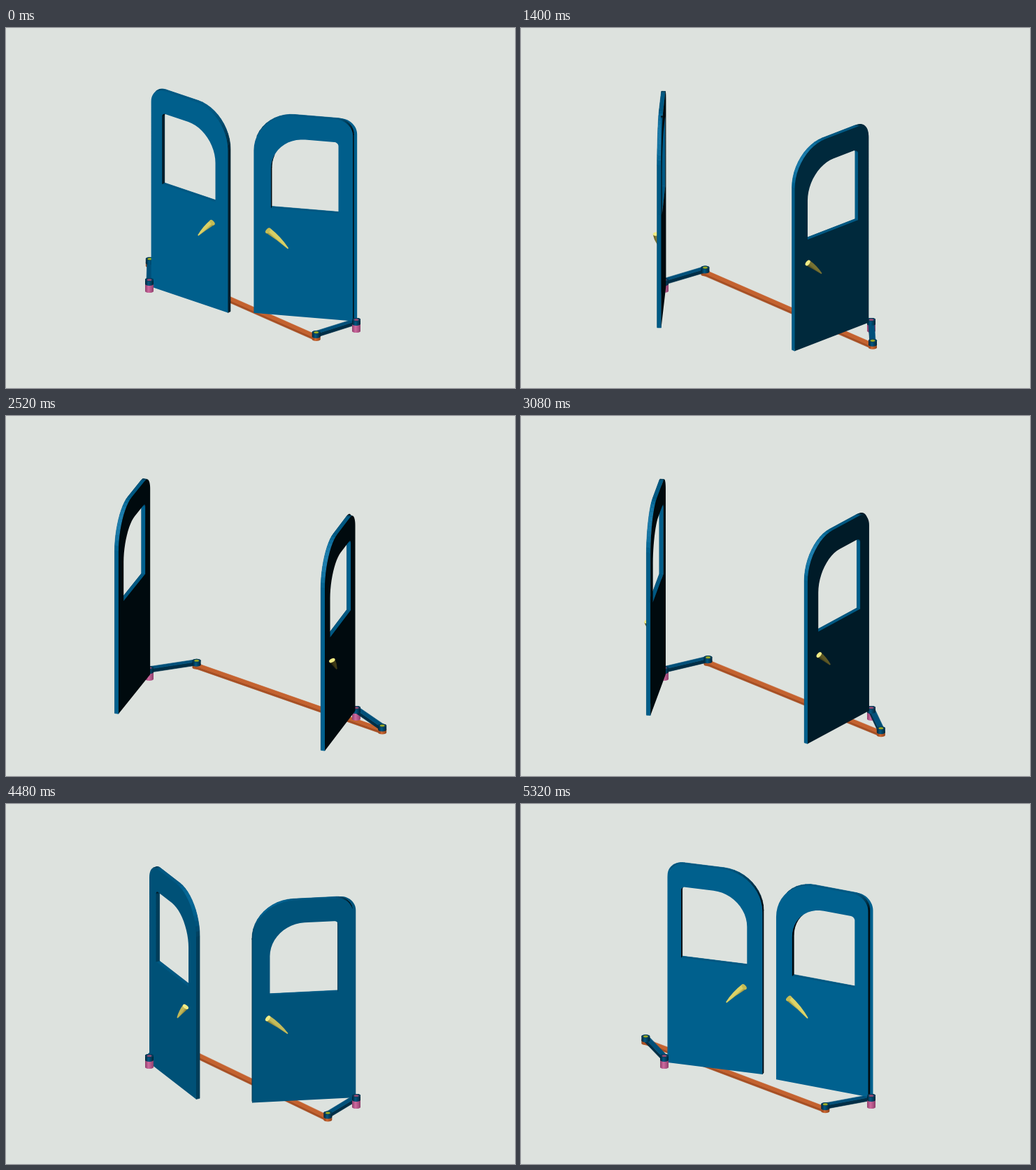
An HTML page with a canvas for the animation above (5600 ms loop, 728x514 px).

```html
<!DOCTYPE html>
<html lang="en">
<head>
<meta charset="utf-8">
<title>Linked double doors</title>
<style>
  html, body { margin: 0; width: 100%; height: 100%; overflow: hidden; background: #dde2de; }
  canvas { display: block; width: 728px; height: 514px; }
</style>
</head>
<body>
<canvas id="stage" width="728" height="514"></canvas>
<script>
const ctx = document.getElementById('stage').getContext('2d');
const RAD = Math.PI / 180;
const STEP = 280;
const TILT = 0.414, RISE = 0.91;        // screen scale of ground depth and of height
const ARM = 72, ROD = 347.5;

// Right door angle in degrees for each time step.
const SWING = [191.3, 191.3, 160, 160, 149, 137, 124.5, 112, 96.5, 107.5,
               117.5, 127.5, 138, 146, 155, 164, 173, 184, 195, 204.5];

const LEFT = {
  x: 205, y: 367, pivotY: 359.5, armOffset: -128.5, end: 147.5,
  front: { w: 3.2, u: 6 }, back: { w: -2.6, u: 4 }, facing: 1,
  grip: { u: 121, w: 6, v: 135 }, tip: { u: 94, w: 5, v: 106.5 }
};
const RIGHT = {
  x: 501, y: 419, pivotY: 416.5, armOffset: -48.6, end: 149.5,
  front: { w: 0, u: 5 }, back: { w: 6, u: 0 }, facing: -1,
  grip: { u: 128, w: -4, v: 133 }, tip: { u: 99, w: -2, v: 106.5 }
};

const LIGHT = { x: Math.cos(116 * RAD), y: Math.sin(116 * RAD), z: 0.9 };
const mix = (a, b, t) => a.map((c, i) => c + (b[i] - c) * t);
const rgb = c => `rgb(${c.map(Math.round)})`;

function brightness(x, y, z) {
  return x * LIGHT.x + y * LIGHT.y + z * LIGHT.z;
}

function paint(k) {
  const base = [0, 97, 143];
  if (k > 1) return rgb(mix(base, [90, 185, 235], k - 1));
  return rgb(mix([0, 10, 14], base, Math.max(0, k)));
}

function trace(points) {
  points.forEach((p, i) => i ? ctx.lineTo(p.x, p.y) : ctx.moveTo(p.x, p.y));
  ctx.closePath();
}

function polygon(points, color, seam) {
  ctx.beginPath();
  trace(points);
  ctx.fillStyle = color;
  ctx.fill();
  if (seam) {
    ctx.strokeStyle = color;
    ctx.lineWidth = 0.6;
    ctx.stroke();
  }
}

function ellipse(x, y, rx, ry, color) {
  ctx.beginPath();
  ctx.ellipse(x, y, rx, ry, 0, 0, 2 * Math.PI);
  ctx.fillStyle = color;
  ctx.fill();
}

// Rectangle with a small rounding at the hinge side and a big one at the free side.
function outline(u0, u1, v0, v1, small, big) {
  const pts = [[u0, v0], [u1, v0]];
  const arc = (cu, cv, r, from) => {
    for (let i = 0; i <= 12; i++) {
      const a = (from + i * 7.5) * RAD;
      pts.push([cu + r * Math.cos(a), cv + r * Math.sin(a)]);
    }
  };
  arc(u1 - big, v1 - big, big, 0);
  arc(u0 + small, v1 - small, small, 90);
  return pts;
}

function projector(door, angle) {
  const c = Math.cos(angle), s = Math.sin(angle);
  return (u, v, w) => ({
    x: door.x + u * c - w * s,
    y: door.y + TILT * (u * s + w * c) - RISE * v
  });
}

function drawRims(pts, near, far, project, angle, side) {
  const c = Math.cos(angle), s = Math.sin(angle);
  pts.forEach(([u, v], i) => {
    const [u2, v2] = pts[(i + 1) % pts.length];
    const len = Math.hypot(u2 - u, v2 - v);
    if (len < 0.01) return;
    const nu = side * (v2 - v) / len, nv = -side * (u2 - u) / len;
    if (nu * s * RISE + nv * TILT <= 0) return;
    polygon([
      project(u, v, near.w), project(u2, v2, near.w),
      project(u2, v2, far.w), project(u, v, far.w)
    ], paint(brightness(nu * c, nu * s, nv)), true);
  });
}

function drawHandle(door, project, k) {
  const a = project(door.grip.u, door.grip.v, door.grip.w);
  const b = project(door.tip.u, door.tip.v, door.tip.w);
  const dx = b.x - a.x, dy = b.y - a.y, len = Math.hypot(dx, dy);
  const nx = -dy / len, ny = dx / len;
  const bow = door.facing * -0.06 * len;
  const mid = { x: a.x + dx / 2 - nx * bow, y: a.y + dy / 2 - ny * bow };
  const off = (p, r) => [p.x + nx * r, p.y + ny * r];
  const shade = Math.max(0, Math.min(1, k));
  const body = mix([62, 58, 22], [222, 213, 104], shade);
  const dark = mix([20, 18, 4], [128, 120, 44], shade);
  const g = ctx.createLinearGradient(...off(a, -5), ...off(a, 5));
  const [first, last] = nx * 0.3 - ny > 0 ? [dark, body] : [body, dark];
  g.addColorStop(0, rgb(first));
  g.addColorStop(0.5, rgb(body));
  g.addColorStop(1, rgb(last));
  ctx.beginPath();
  ctx.moveTo(...off(a, 4.5));
  ctx.quadraticCurveTo(...off(mid, 3.4), ...off(b, 0.8));
  ctx.lineTo(...off(b, -0.8));
  ctx.quadraticCurveTo(...off(mid, -3.4), ...off(a, -4.5));
  ctx.fillStyle = g;
  ctx.fill();
  ctx.beginPath();
  ctx.ellipse(a.x, a.y, 2.6, 4.6, Math.atan2(dy, dx), 0, 2 * Math.PI);
  ctx.fillStyle = k > 0.85 ? '#c5bc55' : '#f1ec86';
  ctx.fill();
}

function drawDoor(door, angle) {
  const project = projector(door, angle);
  const plate = ({ u }) => outline(u, door.end, 0, 314, 23, 59);
  const hole = outline(26, 124.5, 167, 278.5, 6, 50);
  const frontNear = door.facing * Math.cos(angle) > 0;
  const [near, far] = frontNear ? [door.front, door.back] : [door.back, door.front];

  const sign = Math.cos(angle) > 0 ? 1 : -1;
  const k = brightness(-Math.sin(angle) * sign, Math.cos(angle) * sign, 0);
  const face = layer => {
    const screen = pts => pts.map(([u, v]) => project(u, v, layer.w));
    ctx.beginPath();
    trace(screen(plate(layer)));
    trace(screen(hole));
    ctx.fillStyle = paint(k);
    ctx.fill('evenodd');
  };

  if (!frontNear) drawHandle(door, project, 0.5);
  face(far);
  drawRims(plate(near), near, far, project, angle, 1);
  drawRims(hole, near, far, project, angle, -1);
  face(near);
  if (frontNear) drawHandle(door, project, k);
}

function cylinder(x, y, r, h, light, dark) {
  const g = ctx.createLinearGradient(x - r, 0, x + r, 0);
  g.addColorStop(0, dark);
  g.addColorStop(0.4, light);
  g.addColorStop(1, dark);
  ctx.beginPath();
  ctx.ellipse(x, y + h, r, r * TILT, 0, 0, Math.PI);
  ctx.ellipse(x, y, r, r * TILT, 0, Math.PI, 2 * Math.PI);
  ctx.fillStyle = g;
  ctx.fill();
}

function slab(a, b, drop, half, height, top, side) {
  const dx = b.x - a.x, dy = (b.y - a.y) / TILT, len = Math.hypot(dx, dy);
  const flip = dx < 0 ? -1 : 1;
  const ox = -dy / len * half * flip, oy = dx / len * half * flip * TILT;
  const at = (p, s, d) => ({ x: p.x + s * ox, y: p.y + s * oy + drop + d });
  polygon([at(a, 1, 0), at(b, 1, 0), at(b, 1, height), at(a, 1, height)], side, true);
  polygon([at(a, -1, 0), at(b, -1, 0), at(b, 1, 0), at(a, 1, 0)], top, true);
}

function drawHub(x, y, dot) {
  cylinder(x, y, 6, 6, '#005884', '#002436');
  ellipse(x, y, 6, 2.6, '#003c5a');
  ellipse(x, y, 3.4, 1.6, dot);
}

function drawPivot(door) {
  cylinder(door.x, door.pivotY + 5, 6, 11, '#cf6a9f', '#8f3f6c');
  drawHub(door.x, door.pivotY, '#8e4a72');
}

function drawPin(pin) {
  cylinder(pin.x, pin.y + 5, 6, 5, '#d06a34', '#8d431c');
}

function armEnd(door, angle) {
  return { x: door.x + ARM * Math.cos(angle), y: door.pivotY + TILT * ARM * Math.sin(angle) };
}

// Left arm angle from the four-bar linkage.
function solveLeftArm(pin) {
  const dx = pin.x - LEFT.x, dy = (pin.y - LEFT.pivotY) / TILT, d = Math.hypot(dx, dy);
  return Math.atan2(dy, dx) - Math.acos((ARM * ARM + d * d - ROD * ROD) / (2 * ARM * d));
}

function draw(degrees) {
  const rightAngle = degrees * RAD;
  const rightPin = armEnd(RIGHT, rightAngle + RIGHT.armOffset * RAD);
  const leftArm = solveLeftArm(rightPin);
  const leftPin = armEnd(LEFT, leftArm);
  const leftAngle = leftArm - LEFT.armOffset * RAD;

  ctx.fillStyle = '#dde2de';
  ctx.fillRect(0, 0, 728, 514);

  drawPin(leftPin);
  drawPin(rightPin);
  slab(leftPin, rightPin, 6, 4.5, 3.5, '#c4622f', '#a64f24');
  for (const [door, pin] of [[LEFT, leftPin], [RIGHT, rightPin]]) {
    drawPivot(door);
    slab({ x: door.x, y: door.pivotY }, pin, 0, 4, 5, '#00507a', '#002e46');
    drawHub(door.x, door.pivotY, '#8e4a72');
    drawHub(pin.x, pin.y, '#9aa825');
  }

  drawDoor(LEFT, leftAngle);
  drawDoor(RIGHT, rightAngle);
  if (degrees > 165) {
    drawPivot(LEFT);
    drawPivot(RIGHT);
  }
}

let shown = -1;
function tick() {
  const step = Math.floor(performance.now() / STEP) % SWING.length;
  if (step !== shown) draw(SWING[shown = step]);
  requestAnimationFrame(tick);
}
tick();
</script>
</body>
</html>
```
